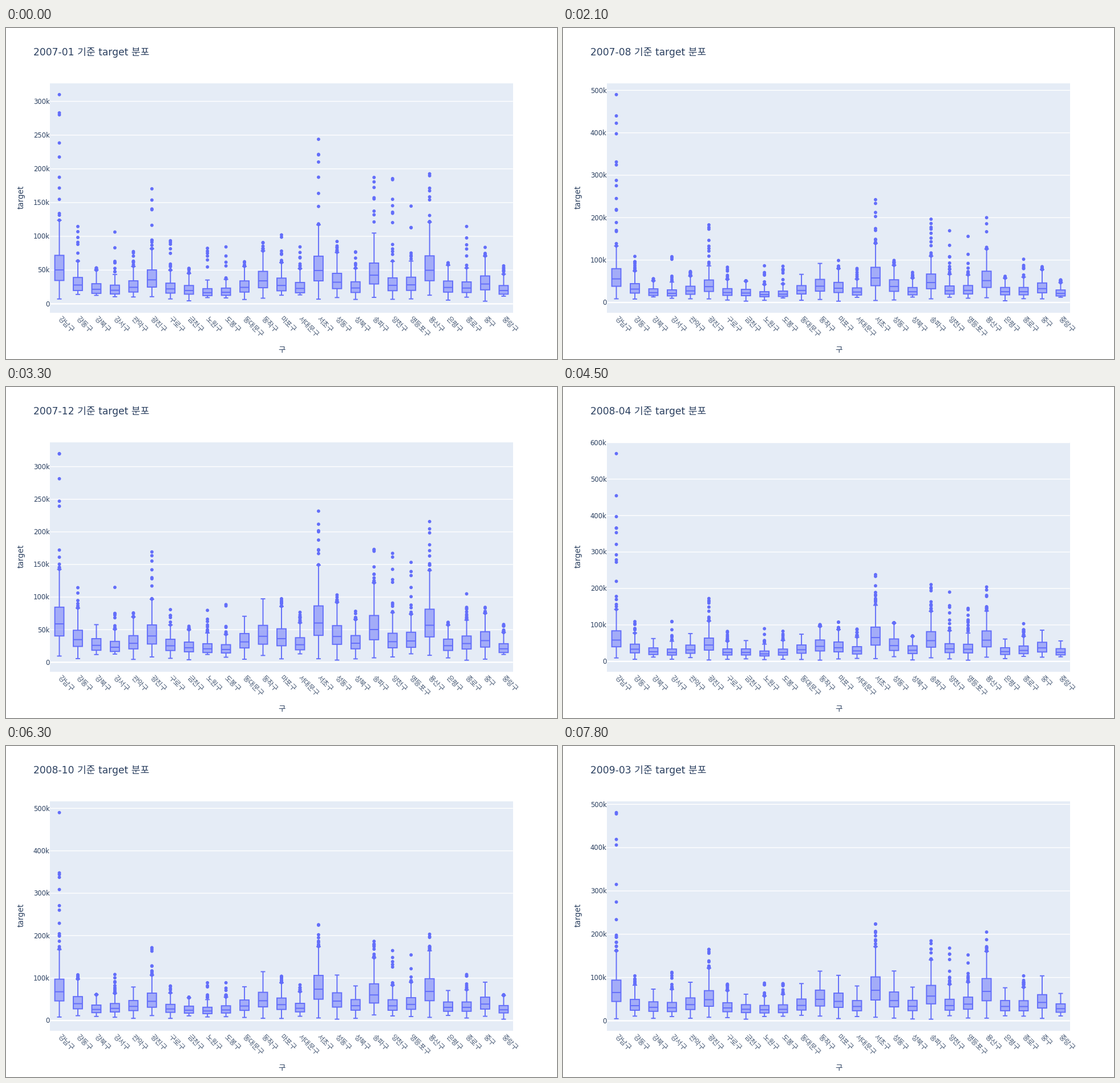
Recreate the animation shown at these times as a matplotlib script. Size 966x580 px, loop 8 s.

```python
import numpy as np
import matplotlib.pyplot as plt
from matplotlib.animation import FuncAnimation
from matplotlib.collections import LineCollection, PolyCollection
from matplotlib.patches import Rectangle

W, H, DPI = 966, 580, 100
LEFT, RIGHT, TOP, BOTTOM = 77.3, 888.7, 96.6, 498.8
INK, BLUE, PANEL = "#2a3f5f", "#636efa", "#e5ecf6"
FILL = (99 / 255, 110 / 255, 250 / 255, 0.5)
FONTS = ["DejaVu Sans", "Noto Sans CJK JP"]
PX = 72 / DPI
MONTHS, HOLD, INTERVAL, FRAMES = 27, 3, 100, 80

# Starting median and usual highest value of each district, in thousands.
DISTRICTS = {
    "강남구": (50, 400), "강동구": (28, 105), "강북구": (21, 57), "강서구": (20, 110), "관악구": (25, 74),
    "광진구": (35, 170), "구로구": (21, 85), "금천구": (19, 52), "노원구": (17, 85), "도봉구": (18, 86),
    "동대문구": (25, 66), "동작구": (34, 97), "마포구": (30, 99), "서대문구": (23, 82), "서초구": (52, 229),
    "성동구": (33, 96), "성북구": (24, 71), "송파구": (43, 190), "양천구": (27, 172), "영등포구": (27, 148),
    "용산구": (50, 200), "은평구": (23, 60), "종로구": (24, 109), "중구": (29, 83), "중랑구": (19, 58),
}
N = len(DISTRICTS)
MEDIANS, PEAKS = np.array(list(DISTRICTS.values()), float).T
GROWTH = 0.016  # monthly rise of every median

# The first district holds the overall maximum, which sets the axis.
RECORD_MONTHS = [0, 4, 7, 11, 15, 21, 26]
RECORDS = [310, 290, 490, 320, 570, 490, 481]

STEP = (RIGHT - LEFT) / N
CENTERS = LEFT + STEP * (np.arange(N) + 0.5)
HALF_BOX = STEP * 0.49 / 2
HALF_CAP = HALF_BOX / 2
ANGLES = np.linspace(0, 2 * np.pi, 24, endpoint=False)
DOT = 2.95 * np.column_stack([np.cos(ANGLES), np.sin(ANGLES)])


def month_data(month):
    """Five box levels per district, and the outliers as (district, value)."""
    rng = np.random.default_rng(month)
    median = MEDIANS * (1 + GROWTH * month) * rng.normal(1, 0.04, N)
    spread = 0.8 * median - 3
    q1, q3 = median - 0.42 * spread, median + 0.58 * spread
    low = np.minimum(rng.uniform(3, 14, N), q1 - 3)
    high = q3 + spread * rng.uniform(1.2, 1.45, N)
    peaks = PEAKS * rng.normal(1, 0.05, N)
    peaks[0] = np.interp(month, RECORD_MONTHS, RECORDS)

    outliers = []
    for i, (start, peak) in enumerate(zip(high, peaks)):
        if peak > start:
            count = int(rng.integers(4, 9) + peak / 50)
            tail = start + (peak - start) * rng.random(count) ** 2.2
            outliers += [(i, value) for value in (*tail, peak)]
    return np.column_stack([low, q1, median, q3, high]), outliers


fig = plt.figure(figsize=(W / DPI, H / DPI), dpi=DPI, facecolor="white")
ax = fig.add_axes([0, 0, 1, 1])
ax.set(xlim=(0, W), ylim=(H, 0))
ax.axis("off")
ax.add_patch(Rectangle((LEFT, TOP), RIGHT - LEFT, BOTTOM - TOP, color=PANEL, lw=0, zorder=0))


def label(x, y, text, size, **style):
    return ax.text(x, y, text, fontsize=size * PX, family=FONTS, color=INK, **style)


def add(collection):
    collection.set_snap(False)
    return ax.add_collection(collection)


def line_layer(color, zorder):
    return add(LineCollection([], colors=color, linewidths=1.93 * PX, zorder=zorder))


title = label(48.3, 48.3, "", 17.15)
label(30.3, 296.5, "target", 13.5, rotation=90, rotation_mode="anchor", ha="center")
label(483, 568, "구", 13.5, ha="center")
for x, name in zip(CENTERS, DISTRICTS):
    label(x - 3.9, 510.7, name, 12.4, rotation=-45, rotation_mode="anchor", alpha=0.85)
tick_labels = [label(76.6, 0, "", 11.6, ha="right") for _ in range(12)]

grid = line_layer("white", 1)
whiskers = line_layer(BLUE, 2)
boxes = add(PolyCollection([], facecolors=FILL, edgecolors=BLUE, linewidths=1.93 * PX,
                           joinstyle="miter", zorder=3))
medians = line_layer(BLUE, 4)
dots = add(PolyCollection([], facecolors=BLUE, linewidths=0, zorder=5))


def level(x, y, half):
    return [(x - half, y), (x + half, y)]


def draw(frame):
    month = min(frame // HOLD, MONTHS - 1)
    stats, outliers = month_data(month)
    low, high = stats.min(), max(stats.max(), max(v for _, v in outliers))
    span = (high - low) * 10 / 9
    base = low - span / 20

    def to_y(value):
        return BOTTOM - (value - base) / span * (BOTTOM - TOP)

    tick_step = next(s for s in (10, 20, 50, 100, 200) if s >= span / 10)
    ticks = np.arange(0, base + span, tick_step)
    grid.set_segments([level((LEFT + RIGHT) / 2, to_y(t), (RIGHT - LEFT) / 2) for t in ticks])
    grid.set_linewidths([(1.4 if t else 2.4) * PX for t in ticks])
    for text in tick_labels:
        text.set_text("")
    for text, t in zip(tick_labels, ticks):
        text.set_text(f"{t:.0f}k" if t else "0")
        text.set_y(to_y(t) + 4.3)

    lines, rects, mids = [], [], []
    for x, (lo, q1, mid, q3, hi) in zip(CENTERS, to_y(stats)):
        lines += [[(x, lo), (x, q1)], [(x, q3), (x, hi)], level(x, lo, HALF_CAP), level(x, hi, HALF_CAP)]
        rects.append(level(x, q1, HALF_BOX) + level(x, q3, HALF_BOX)[::-1])
        mids.append(level(x, mid, HALF_BOX))
    whiskers.set_segments(lines)
    boxes.set_verts(rects)
    medians.set_segments(mids)
    dots.set_verts([DOT + (CENTERS[i], to_y(v)) for i, v in outliers])
    title.set_text(f"{2007 + month // 12}-{month % 12 + 1:02d} 기준 target 분포")
    return title, grid, whiskers, boxes, medians, dots, *tick_labels


anim = FuncAnimation(fig, draw, frames=FRAMES, interval=INTERVAL, repeat=True, repeat_delay=0)
plt.show()
```
